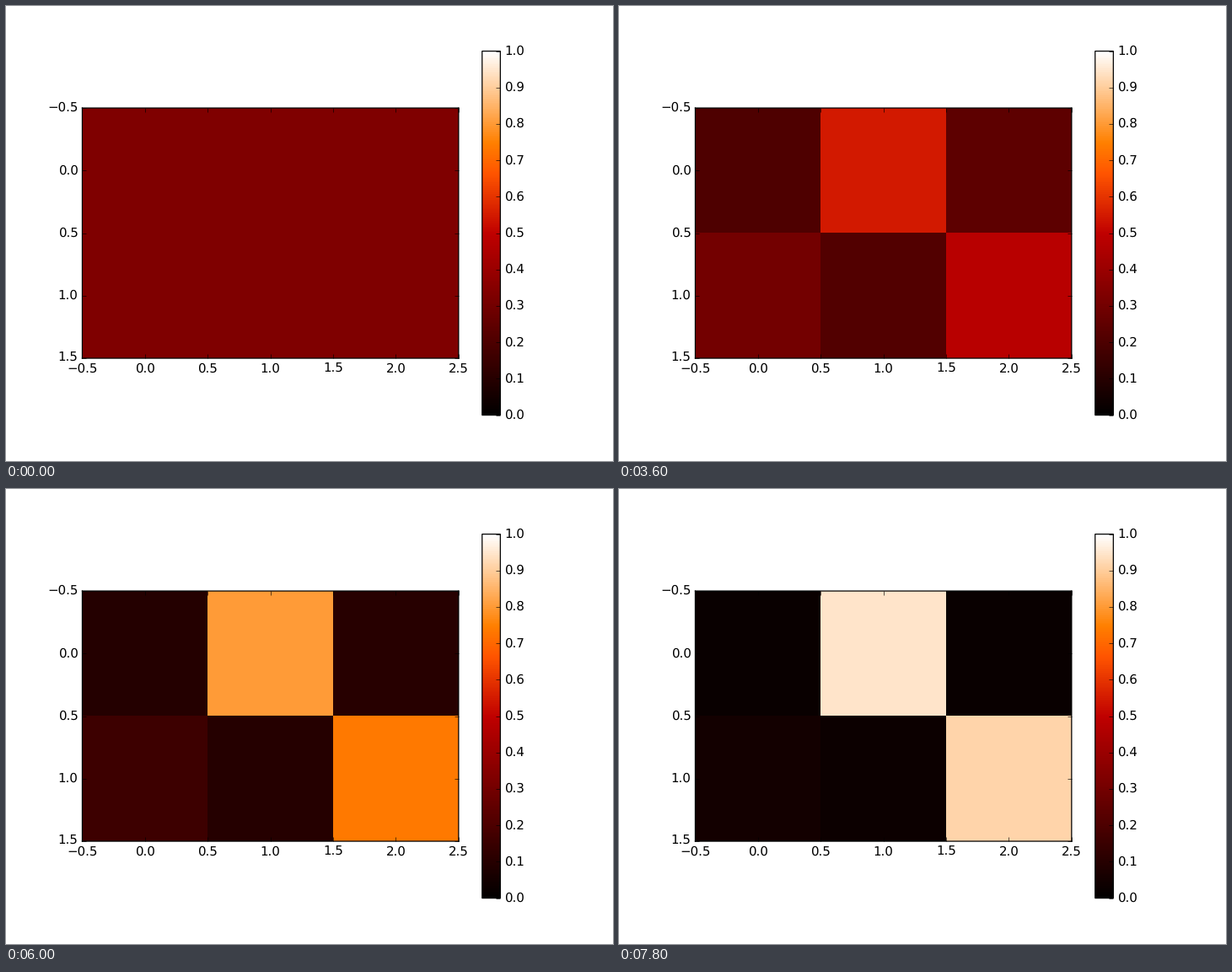
Write a matplotlib script that moves like this. It is 720x540 px and loops after 8000 ms.

```python
import numpy as np
import matplotlib.pyplot as plt
from matplotlib.animation import FuncAnimation

plt.style.use("classic")
plt.rcParams.update({
    "font.family": "DejaVu Sans",
    "text.hinting": "none",
    "path.snap": False,
    "figure.facecolor": "white",
    "savefig.facecolor": "white",
    "savefig.dpi": "figure",
})

WIDTH, HEIGHT, DPI = 720, 540, 90
TICK_MS = 100
TICKS_PER_STEP = 3
TOTAL_TICKS = 80
LAST_STEP = 26
NUDGE = 0.45  # sub-pixel offset of all frame lines, right and up

# How far the winning cell of each row is ahead of the others, in log odds.
LEAD_STEPS = [0, 5, 12, 16, 20, 26]
TOP_LEAD = [0, 0.43, 0.90, 1.33, 2.10, 3.59]
BOTTOM_LEAD = [0, 0.32, 0.63, 0.87, 1.74, 3.10]


def smoothstep(x):
    x = np.clip(x, 0, 1)
    return x * x * (3 - 2 * x)


def shares(lead, split):
    """Probabilities of the winner and of two losers that differ by split."""
    weights = np.exp([lead, split / 2, -split / 2])
    return weights / weights.sum()


def table_at(step):
    top_split = -0.17 * np.sin(np.pi * step / LAST_STEP) ** 2
    bottom_split = 0.48 * smoothstep((step - 4) / 13)
    top = shares(np.interp(step, LEAD_STEPS, TOP_LEAD), top_split)
    bottom = shares(np.interp(step, LEAD_STEPS, BOTTOM_LEAD), bottom_split)
    return np.array([np.roll(top[[1, 0, 2]], 0), np.roll(bottom, -1)])


fig, ax = plt.subplots(figsize=(WIDTH / DPI, HEIGHT / DPI), dpi=DPI)
dx, dy = NUDGE / WIDTH, NUDGE / HEIGHT
fig.subplots_adjust(left=0.125 + dx, right=0.9 + dx,
                    bottom=0.1 + dy, top=0.9 + dy)

image = ax.imshow(table_at(0), cmap="gist_heat", vmin=0, vmax=1,
                  interpolation="nearest", aspect=0.998)
ax.set_xticks(np.arange(-0.5, 2.6, 0.5))
ax.set_yticks(np.arange(-0.5, 1.6, 0.5))

bar = fig.colorbar(image, ax=ax, ticks=np.linspace(0, 1, 11))
bar.ax.tick_params(direction="in", left=False, right=True)


def update(tick):
    image.set_data(table_at(tick // TICKS_PER_STEP))
    return [image]


anim = FuncAnimation(fig, update, frames=TOTAL_TICKS, interval=TICK_MS,
                     repeat=True, repeat_delay=0, blit=False)
plt.show()
```
